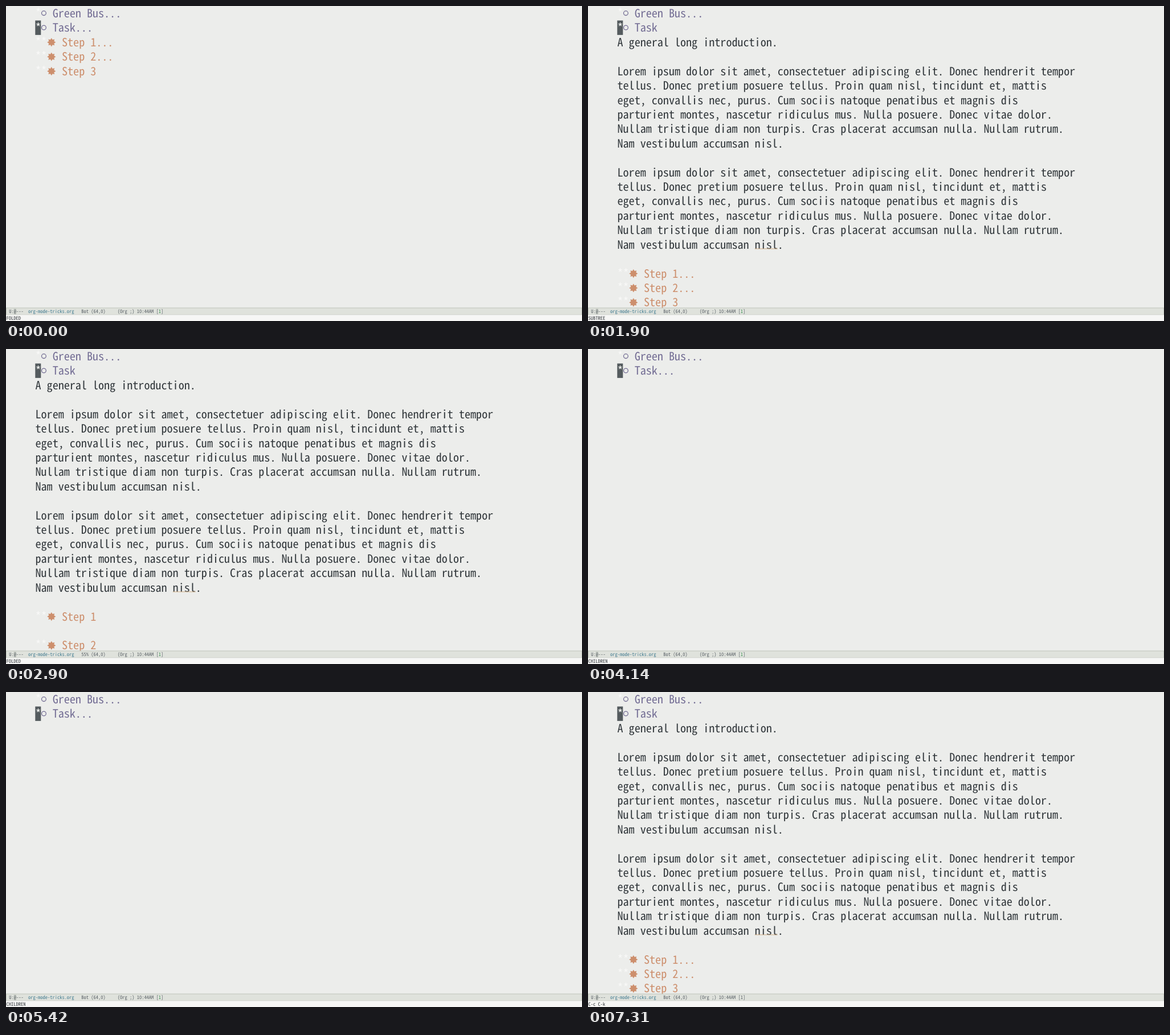
Write an HTML page that moves like this. It is 1011 by 554 pixels and loops after 8000 ms.

```html
<!DOCTYPE html>
<html lang="en">
<head>
<meta charset="utf-8">
<title>Outline folding</title>
<style>
  html, body { margin: 0; width: 100%; height: 100%; overflow: hidden; background: #ecedeb; }
  svg { display: block; width: 1011px; height: 554px; }
  text { white-space: pre; text-rendering: geometricPrecision; font-variant-ligatures: none; }
</style>
</head>
<body>
<svg id="stage" viewBox="0 0 1011 554"></svg>
<script>
const FONT = '"Noto Sans Mono CJK JP", "Noto Sans Mono", "DejaVu Sans Mono", monospace';
const LOOP = 8000, LEFT = 51.5, CELL = 10.05, SMALL_CELL = 4.235, PITCH = 25.42, BASE = 20;
const INK = '#30363a', PURPLE = '#736d94', ORANGE = '#cd8f6d', FAINT = '#f8f8f7', GREY = '#596066';
const stage = document.getElementById('stage');

// Font sizes follow from the character cell of whichever monospaced face is present.
const pen = document.createElement('canvas').getContext('2d');
pen.font = `100px ${FONT}`;
const advance = pen.measureText('m').width / 100;
const SIZE = CELL / advance, SMALL = SMALL_CELL / advance;

function add(parent, tag, attrs) {
  const el = document.createElementNS('http://www.w3.org/2000/svg', tag);
  for (const key in attrs) el.setAttribute(key, attrs[key]);
  return parent.appendChild(el);
}

function write(parent, x, y, string, fill, size = SIZE) {
  const el = add(parent, 'text', { x, y, fill, 'font-size': size, 'font-family': FONT });
  el.textContent = string;
  return el;
}

const box = (x, y, width, height, fill) => add(stage, 'rect', { x, y, width, height, fill });
const column = n => LEFT + n * CELL;
const baseline = row => BASE + row * PITCH;
const small = (col, string, fill) => write(stage, 1 + col * SMALL_CELL, 540.2, string, fill, SMALL);

function ring(row) {
  add(stage, 'circle', { cx: 66.4, cy: baseline(row) - 7.4, r: 3.9, fill: 'none',
    stroke: PURPLE, 'stroke-width': 1.3 });
}

function step(parent, row, label) {
  const y = baseline(row);
  const points = Array.from({ length: 16 }, (_, i) => {
    const r = i % 2 ? 4.9 : 7.6, a = i * Math.PI / 8;
    return `${(79.8 + r * Math.sin(a)).toFixed(2)},${(y - 7 - r * Math.cos(a)).toFixed(2)}`;
  });
  write(parent, LEFT, y - 1, '**', FAINT);
  add(parent, 'polygon', { points: points.join(' '), fill: ORANGE });
  write(parent, 98, y, label, ORANGE);
}

function steps(rows) {
  const group = add(stage, 'g', {});
  for (const [row, label] of rows) step(group, row, label);
  return group;
}

const lorem = [
  'Lorem ipsum dolor sit amet, consectetuer adipiscing elit. Donec hendrerit tempor',
  'tellus. Donec pretium posuere tellus. Proin quam nisl, tincidunt et, mattis',
  'eget, convallis nec, purus. Cum sociis natoque penatibus et magnis dis',
  'parturient montes, nascetur ridiculus mus. Nulla posuere. Donec vitae dolor.',
  'Nullam tristique diam non turpis. Cras placerat accumsan nulla. Nullam rutrum.',
  'Nam vestibulum accumsan nisl.'
];

box(0, 0, 1011, 554, '#ecedeb');
write(stage, LEFT, baseline(0) - 1, '*', FAINT);
ring(0);
write(stage, column(3), baseline(0), 'Green Bus...', PURPLE);
box(51.3, 25.5, 10, 25.4, '#545b5e');
write(stage, LEFT, baseline(1), '*', '#f4f5f3');
ring(1);
const task = write(stage, column(3), baseline(1), '', PURPLE);

const body = add(stage, 'g', {});
write(body, LEFT, baseline(2), 'A general long introduction.', INK);
for (const top of [4, 11])
  lorem.forEach((line, i) => write(body, LEFT, baseline(top + i), line, INK));
add(body, 'path', { d: `M${column(24)} 427H${column(28)}`, stroke: '#d0ad83', 'stroke-width': 1 });

const folded = ['Step 1...', 'Step 2...', 'Step 3'];
const lists = {
  top: steps(folded.map((label, i) => [2 + i, label])),
  low: steps(folded.map((label, i) => [18 + i, label])),
  open: steps([[18, 'Step 1'], [20, 'Step 2']])
};

// Status line and echo area
box(0, 530.5, 1011, 13, '#bfc5bb');
box(1, 531.5, 1009.3, 11.2, '#dfe2dc');
box(0, 543.4, 1011, 10.6, '#f6f6f5');
box(1 + 3 * SMALL_CELL, 532.3, SMALL_CELL, 9.8, '#c2c7c0');
small(1, 'U:@---', GREY);
small(9, 'org-mode-tricks.org', '#427c91');
const place = small(31, '', GREY);
small(46, '(Org ;) 10:44AM [', GREY);
const count = small(63, '1', GREY);
small(64, ']', GREY);
const echo = write(stage, 0.5, 551.8, '', '#34393d', SMALL);

const scenes = [
  { at: 0, list: 'top', echo: 'FOLDED' },
  { at: 940, echo: 'CHILDREN' },
  { at: 1900, list: 'low', text: true, echo: 'SUBTREE' },
  { at: 2900, list: 'open', text: true, place: '55%', echo: 'FOLDED' },
  { at: 4140, echo: 'CHILDREN' },
  { at: 6280, list: 'low', text: true, echo: 'C-c C-k', count: GREY }
];

const show = (el, on) => el.setAttribute('display', on ? 'inline' : 'none');

let current;
function render(time) {
  const scene = scenes.findLast(s => s.at <= time % LOOP);
  if (scene === current) return;
  current = scene;
  task.textContent = scene.text ? 'Task' : 'Task...';
  show(body, scene.text);
  for (const name in lists) show(lists[name], name === scene.list);
  place.textContent = `${scene.place || 'Bot'} (64,0)`;
  count.setAttribute('fill', scene.count || '#3c9352');
  echo.textContent = scene.echo;
}

const start = performance.now();
function tick() {
  render(performance.now() - start);
  requestAnimationFrame(tick);
}
tick();
</script>
</body>
</html>
```
